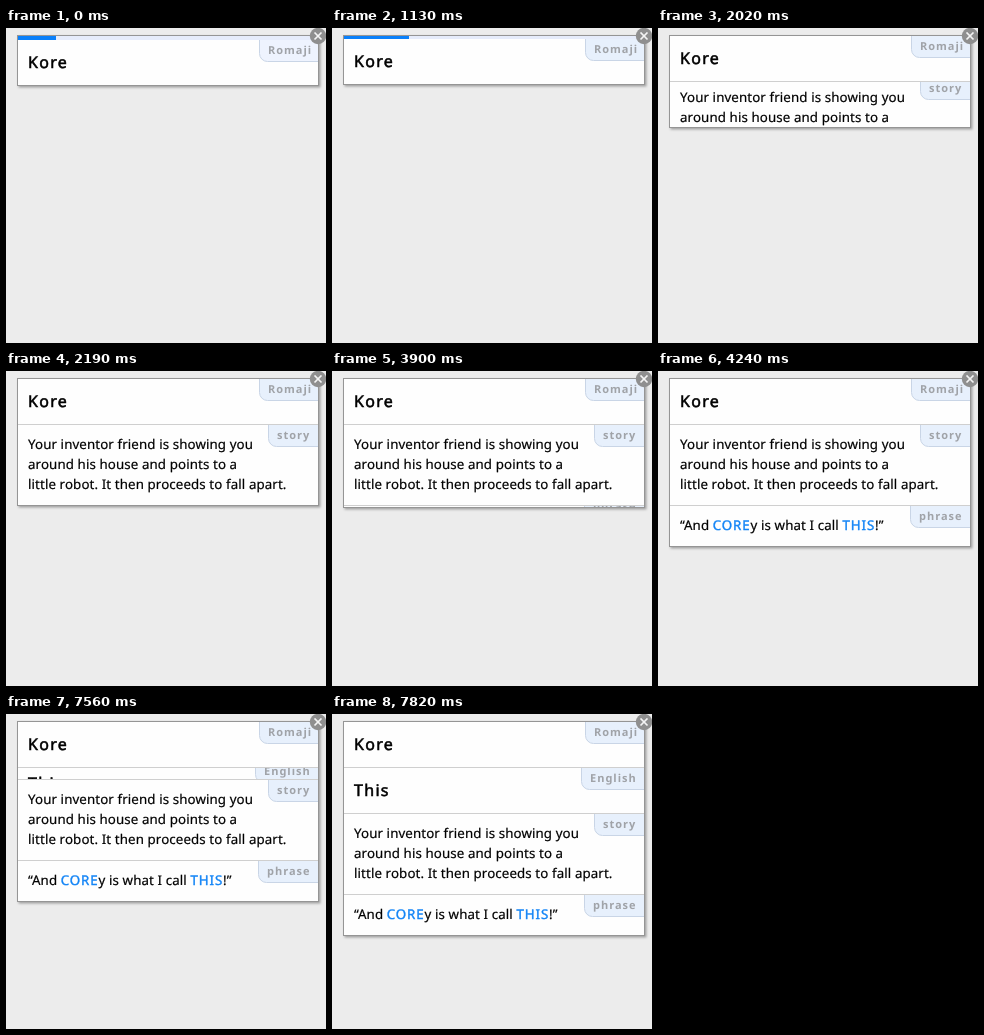
Write an HTML page that moves like this. It is 320 px wide and 315 px high and loops after 8000 ms.

```html
<!DOCTYPE html>
<html lang="en">
<head>
<meta charset="utf-8">
<title>Word card</title>
<style>
html, body { margin: 0; width: 100%; height: 100%; overflow: hidden; background: #ececec; }
#stage { display: block; }
text { font-family: "Noto Sans", "Open Sans", sans-serif; text-rendering: geometricPrecision; white-space: pre; }
.body { font-size: 13.3px; letter-spacing: .11px; stroke: #000; stroke-width: .2px; }
.word { font-size: 16px; letter-spacing: 1.3px; stroke: #000; stroke-width: .55px; }
.tag { font-size: 11px; font-weight: 700; letter-spacing: 1px; fill: #a0a3a8; }
.key { fill: #1284f6; stroke: #1284f6; stroke-width: .4px; letter-spacing: .9px; }
</style>
</head>
<body>
<svg id="stage" width="320" height="315" viewBox="0 0 320 315">
  <defs>
    <filter id="shadow" x="-5%" y="-10%" width="112%" height="130%">
      <feDropShadow dx="1.5" dy="1.5" stdDeviation="1.1" flood-color="#000" flood-opacity=".32"/>
    </filter>
  </defs>
  <rect width="320" height="315" fill="#ececec"/>
  <rect id="card" x="11.5" y="7.5" width="301" fill="#fefefe" stroke="#959595" filter="url(#shadow)"/>
  <rect id="track" x="12" y="8" width="300" fill="#e6ecfb"/>
  <rect id="bar" x="12" y="8" fill="#0a80fa"/>
  <g id="list"></g>
  <circle cx="312" cy="8" r="8.2" fill="#8f8f8f"/>
  <path d="M308.5 4.5l7 7m0-7l-7 7" stroke="#f4f4f4" stroke-width="1.7" fill="none"/>
</svg>
<script>
const LOOP = 8000, TOP = 8, PAD = 10, SLIDE = 400, LEAD = 48;
const $ = id => document.getElementById(id);
const set = (el, attrs) => { for (const k in attrs) el.setAttribute(k, attrs[k]); };
const make = (name, attrs, parent) => {
  const el = document.createElementNS("http://www.w3.org/2000/svg", name);
  set(el, attrs);
  return parent.appendChild(el);
};

const line = (cls, y, html) => `<text class="${cls}" x="10" y="${y}">${html}</text>`;
const key = s => `<tspan class="key">${s}</tspan>`;

const sections = [
  { tag: "Romaji", left: 241, h: 45, html: line("word", 28, "Kore") },
  { tag: "English", left: 237, h: 45, at: 7390, end: 7820, n: 6, html: line("word", 28, "This") },
  { tag: "story", left: 250, h: 80, at: 1850, end: 2190, n: 5,
    html: ["Your inventor friend is showing you", "around his house and points to a",
      "little robot. It then proceeds to fall apart."].map((s, i) => line("body", 24 + 20 * i, s)).join("") },
  { tag: "phrase", left: 240, h: 40, at: 3900, end: 4240, n: 5,
    html: line("body", 24, `“And ${key("CORE")}y is what I call ${key("THIS")}!”`) }
];

for (const s of sections) {
  s.group = make("g", {}, $("list"));
  s.rule = make("rect", { x: 12, width: 300, height: 1, fill: "#cfcfcf" }, s.group);
  s.view = make("svg", { x: 12, width: 300, overflow: "hidden" }, s.group);
  s.inner = make("g", {}, s.view);
  s.inner.innerHTML =
    `<path d="M${s.left + .5} -1V13.5a8 8 0 0 0 8 8H301V-1z" fill="#e7f0fc" stroke="#c9d5e6"/>` +
    `<text class="tag" x="${s.left + 9}" y="14">${s.tag}</text>` + s.html;
}

// Number of ticks passed when n ticks are spread evenly from a to b
const ticks = (t, a, b, n) =>
  t < a ? 0 : Math.min(n, 1 + Math.floor((t - a) / (b - a) * (n - 1) + 1e-6));
const swing = p => .5 - Math.cos(Math.PI * Math.min(1, p)) / 2;

// Eased slide progress, advanced once per tick
function slide(t, a, b, n) {
  const k = ticks(t, a, b, n);
  if (!k || k === n) return k ? 1 : 0;
  return swing((LEAD + (k - 1) * (b - a) / (n - 1)) / SLIDE);
}

function draw(t) {
  const barH = Math.round(4 * (1 - slide(t, 960, 1310, 5)));
  set($("track"), { height: barH });
  set($("bar"), { height: barH, width: 38 + 2.7 * ticks(t, 90, 870, 10) });

  let y = TOP + barH;
  sections.forEach((s, i) => {
    const p = s.at ? slide(t, s.at, s.end, s.n) : 1;
    set(s.group, { visibility: p ? "visible" : "hidden" });
    if (!p) return;
    set(s.rule, { y, height: i ? 1 : 0 });
    if (i) y++;
    const h = Math.floor(s.h * p);
    set(s.view, { y, height: h });
    set(s.inner, { transform: `translate(0 ${Math.round(PAD * (p - 1))})` });
    y += h;
  });
  set(sections[0].inner.firstChild, { fill: t < 960 ? "#eef3fe" : "#e7f0fc" });
  set($("card"), { height: y - TOP + 1 });
}

const start = performance.now();
function frame() {
  draw((performance.now() - start) % LOOP);
  requestAnimationFrame(frame);
}
frame();
</script>
</body>
</html>
```
